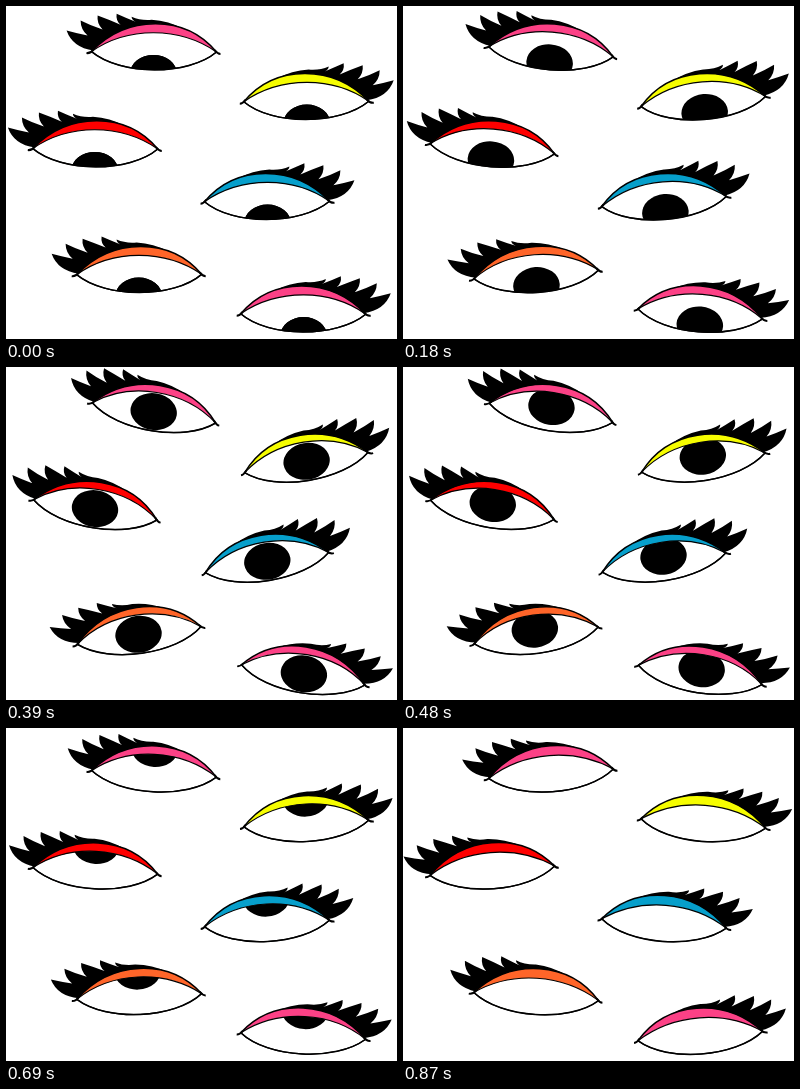
An HTML page with a canvas that plays this animation: 391 by 333 pixels, repeating every 900 ms.

```html
<!DOCTYPE html>
<html lang="en">
<head>
<meta charset="utf-8">
<title>Rolling eyes</title>
<style>
  html, body { margin: 0; width: 100%; height: 100%; overflow: hidden; background: #fff; }
  canvas { display: block; }
</style>
</head>
<body>
<canvas width="391" height="333"></canvas>
<script>
const ctx = document.querySelector('canvas').getContext('2d');
const LOOP = 900, STEP = 30;

// x, y, lid colour, mirror (-1 puts the lashes on the right), tilt factor
const eyes = [
  [147.5, 45.8, '#fc4186', 1, 1],
  [300.8, 95.5, '#f6fd00', -1, -1],
  [88.8, 142.8, '#ff0000', 1, 1],
  [261.5, 195.5, '#069fcb', -1, -1],
  [132.7, 268.5, '#ff6529', 1, -0.87],
  [297.7, 308, '#fc4186', -1, 1]
];

// [time, value] pairs
const tilt = [[0, 0.2], [180, 4.6], [300, 7.9], [420, 9.8], [570, 7.4], [690, 3], [870, -4.3]];
const gaze = [[0, 21.5], [180, 11], [300, 0], [390, -1.2], [570, -11.5], [690, -25.3], [870, -41]];

// Outlines around an eye centred on 0,0
const upper = 'M-62 0C-42-21-18-28 2-28C27-28 47-19 63 0';
const lower = 'C35 24-33 24-62 0Z';
const lid = new Path2D(upper + lower);
const tails = new Path2D('M-60-2Q-63 2-67 1.5M61-2Q64 2 67 2');
const lashes = new Path2D(
  'M-60-1Q-81-4-87-21Q-76-18-66-16' +
  'Q-73-22-73-31Q-63-26-51-22' +
  'Q-57-28-56-36Q-45-32-33-27' +
  'Q-38-31-37-38Q-28-34-18-30' +
  'Q-22-32-22-35Q-13-31-2-32' +
  'Q15-31 30-23L2-27C-18-27-42-20-60-1Z');

function valueAt(keys, t) {
  const i = Math.max(1, keys.findIndex(k => k[0] >= t));
  const [t0, a] = keys[i - 1], [t1, b] = keys[i];
  return a + (b - a) * (t - t0) / (t1 - t0);
}

// The coloured lid gets thinner as the eye opens
function eyeball(open) {
  const top = -19 - open * 0.17;
  return new Path2D(`M-62 0C-42 ${top + 5}-20 ${top} 0 ${top}C24 ${top} 44 ${top + 6} 63 0` + lower);
}

function pupil(y) {
  ctx.beginPath();
  ctx.ellipse(0, y, 23.3, 18.4, 0, 0, Math.PI * 2);
  ctx.fill();
}

function drawEye([x, y, colour, mirror, turn], t) {
  const angle = valueAt(tilt, t), look = valueAt(gaze, t);
  const white = eyeball(angle);
  ctx.save();
  ctx.translate(x, y);
  ctx.rotate(turn * angle * Math.PI / 180);
  ctx.scale(mirror, 1);
  ctx.fillStyle = '#000';
  ctx.fill(lashes);
  ctx.fillStyle = colour;
  ctx.fill(lid);
  ctx.fillStyle = '#fff';
  ctx.fill(white);

  ctx.save();
  ctx.clip(white);
  ctx.fillStyle = '#000';
  pupil(look);
  if (t < 345) pupil(Math.min(look + 12, 21.5)); // lower half trails while rising
  ctx.restore();

  ctx.lineWidth = 1.5;
  ctx.stroke(lid);
  ctx.lineWidth = 1.2;
  ctx.stroke(white);
  ctx.lineWidth = 2;
  ctx.stroke(tails);
  ctx.restore();
}

function frame() {
  const t = Math.floor(performance.now() % LOOP / STEP) * STEP;
  ctx.clearRect(0, 0, 391, 333);
  eyes.forEach(eye => drawEye(eye, t));
  requestAnimationFrame(frame);
}
frame();
</script>
</body>
</html>
```
